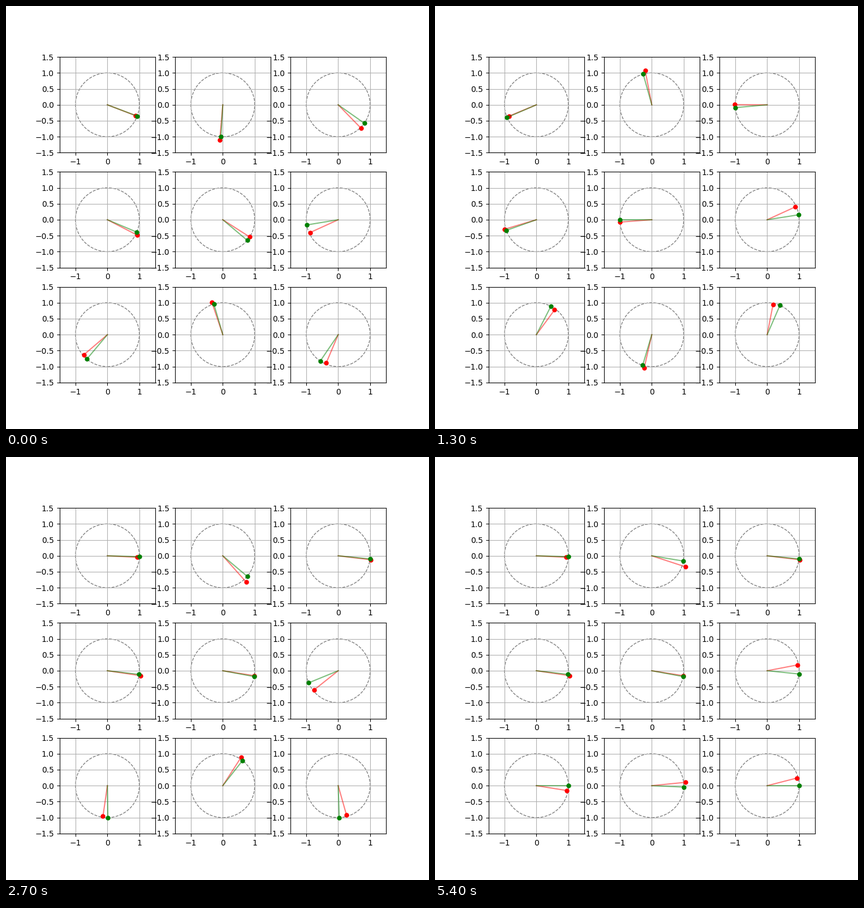
Write a matplotlib script that moves like this. It is 748 px wide and 748 px high and loops after 10 s.

```python
import numpy as np
import matplotlib.pyplot as plt
from matplotlib.animation import FuncAnimation

FRAMES, INTERVAL = 100, 100


class Dial:
    """A green arm turning at a steady rate and a red arm near it.

    Angles are in degrees; the red arm's lead drifts from first to rest.
    """

    def __init__(self, ax, start, rate, lead, rest_lead, length):
        self.start, self.rate = start, rate
        self.leads, self.length = (lead, rest_lead), length
        # Halt on the last step that does not pass the positive x axis.
        goal = 360 if start < 0 else 720
        self.stop = int((goal - start) / rate + 0.02)
        self.red = make_arm(ax, "red")
        self.green = make_arm(ax, "green")

    def move(self, step):
        t = min(step, self.stop)
        angle = self.start + self.rate * t
        lead = np.interp(t, (0, self.stop), self.leads)
        point(self.red, angle + lead, self.length)
        point(self.green, angle, 1)
        return self.red + self.green


def make_arm(ax, color):
    line, = ax.plot([], [], color=color, alpha=0.5)
    dot, = ax.plot([], [], "o", color=color, markersize=5)
    return line, dot


def point(arm, degrees, length):
    a = np.radians(degrees)
    x, y = length * np.cos(a), length * np.sin(a)
    arm[0].set_data([0, x], [0, y])
    arm[1].set_data([x], [y])


def dress(ax):
    ax.set_aspect("equal")
    ax.add_patch(plt.Circle((0, 0), 1, fill=False, color="gray",
                            linestyle="--"))
    ax.set(xlim=(-1.5, 1.5), ylim=(-1.5, 1.5), xticks=[-1, 0, 1],
           yticks=np.arange(-1.5, 1.6, 0.5))
    ax.grid(True)


# start, rate, first lead, rest lead, red length
SETUP = [
    (-20.7, 17.23, -0.3, -1.1, 0.935),
    (-93.4, 15.31, -1.5, -8.7, 1.103),
    (-35.2, 16.94, -10.5, -1.3, 1.026),
    (-22.8, 17.10, -4.5, -1.8, 1.043),
    (-40.1, 16.94, 7.5, 1.5, 0.998),
    (189.4, 13.81, 15.1, 16.7, 0.966),
    (229.9, 14.85, -9.4, -9.0, 0.964),
    (106.2, 11.32, 2.4, 8.2, 1.067),
    (235.8, 14.67, 11.3, 14.5, 0.953),
]

fig, axes = plt.subplots(3, 3, figsize=(7.48, 7.48), dpi=100)
fig.subplots_adjust(left=0.126, right=0.899, bottom=0.1098, top=0.8796)
for ax in axes.flat:
    dress(ax)
dials = [Dial(ax, *setup) for ax, setup in zip(axes.flat, SETUP)]


def update(step):
    return [artist for dial in dials for artist in dial.move(step)]


def init():
    return update(0)


anim = FuncAnimation(fig, update, frames=FRAMES, init_func=init,
                     interval=INTERVAL, blit=True, repeat=True,
                     repeat_delay=0)
plt.show()
```
